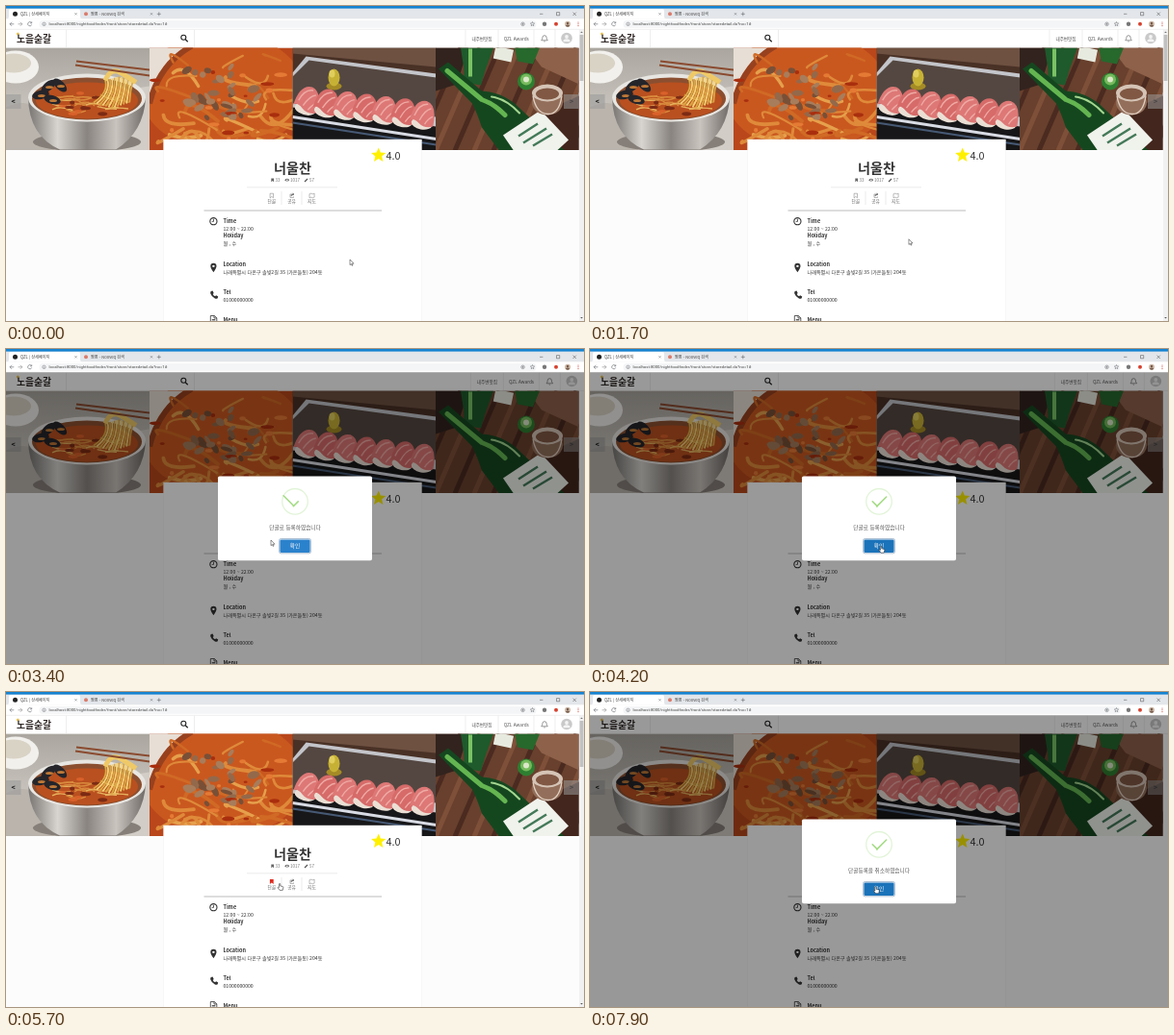
Animation, 600 px wide and 328 px high, one loop 8 s. Source, as an HTML page:

```html
<!DOCTYPE html>
<html lang="ko">
<head>
<meta charset="utf-8">
<title>상세페이지</title>
<style>
html, body { margin: 0; width: 100%; height: 100%; overflow: hidden; background: #fcfcfc; }
svg { display: block; width: 100vw; height: 100vh; }
text { font-family: "Noto Sans CJK KR", "Noto Sans CJK", "Noto Sans", sans-serif; white-space: pre; }
.url { font-family: Roboto, sans-serif; }
</style>
</head>
<body>
<svg id="stage" viewBox="0 0 600 328" preserveAspectRatio="none"></svg>
<script>
const LOOP = 8000;
let seed = 7;
const rnd = (a = 0, b = 1) => {
  seed = (seed * 16807) % 2147483647;
  return a + (b - a) * seed / 2147483647;
};
const times = (n, fn) => Array.from({ length: n }, (_, i) => fn(i)).join("");

// Markup helpers
const rect = (x, y, w, h, fill, more = "") =>
  `<rect x="${x}" y="${y}" width="${w}" height="${h}" fill="${fill}" ${more}/>`;
const oval = (x, y, rx, ry, fill, more = "") =>
  `<ellipse cx="${x}" cy="${y}" rx="${rx}" ry="${ry}" fill="${fill}" ${more}/>`;
const dot = (x, y, r, fill, more) => oval(x, y, r, r, fill, more);
const shape = (d, fill, more = "") => `<path d="${d}" fill="${fill}" ${more}/>`;
const line = (d, color, w = .6, more = "") =>
  `<path d="${d}" fill="none" stroke="${color}" stroke-width="${w}" ${more}/>`;
const text = (x, y, size, str, fill = "#444", more = "") =>
  `<text x="${x}" y="${y}" font-size="${size}" fill="${fill}" ${more}>${str}</text>`;
const mid = 'text-anchor="middle"';
const bold = 'font-weight="700"';
const round = 'stroke-linecap="round" stroke-linejoin="round"';
const at = (x, y, body) => `<g transform="translate(${x} ${y})">${body}</g>`;
const panel = (x, w, body) =>
  `<svg x="${x}" y="43.5" width="${w}" height="106.5" viewBox="0 0 ${w} 106.5">${body}</svg>`;

function browser() {
  const ink = "#5f6368";
  return rect(0, 0, 600, 13.5, "#e3e6ea") + rect(0, 0, 600, 2.6, "#1583d1") +
    shape("M1 13.5Q3 13 3 11V5Q3 3 5 3H75Q77 3 77 5V11Q77 13 79 13.5Z", "#fff") +
    dot(9.5, 8.3, 2.5, "#222") + text(15, 9.9, 4.15, "QZL | 상세페이지", "#333") +
    dot(83, 8.3, 2, "#d97b6c") + text(88, 9.9, 4.1, "짬뽕 - Nooveq 검색", "#444") +
    [72.5, 151].map(x => line(`M${x - 1.1} 7.2l2.2 2.2m0-2.2l-2.2 2.2`, ink, .5)).join("") +
    line("M156.8 8.3h4M158.8 6.3v4", ink) +
    line("M554 8.3h3.4M571.5 6.6h3.2v3.2h-3.2zM588.5 6.6l3.4 3.4m0-3.4l-3.4 3.4", "#444", .5) +
    rect(0, 13.5, 600, 10.8, "#fff") + rect(34.5, 15, 516, 7.8, "#f4f5f6", 'rx="3.9"') +
    line("M8.3 18.8H4m2-2l-2 2 2 2", ink) + line("M12.5 18.8h4.3m-2-2l2 2-2 2", "#888") +
    line("M26.4 17.4a2.1 2.1 0 1 0 .3 2M26.7 16.3v1.6h-1.6", ink) +
    dot(39.5, 18.8, 1.7, "none", `stroke="${ink}" stroke-width=".5"`) + line("M39.5 18.5v1.2", ink, .5) +
    text(44.5, 20.4, 4.25, "localhost:8000/nightfoodfinder/front/store/storedetail.do?no=1#", "#444", 'class="url"') +
    dot(536.5, 18.8, 1.8, "none", `stroke="${ink}" stroke-width=".5"`) + line("M535.4 18.8h2.2M536.5 17.7v2.2", ink, .5) +
    at(546.5, 18.8, star(2.3, "none", `stroke="${ink}" stroke-width=".5"`)) +
    dot(559, 18.8, 2.2, "#777") + dot(571, 18.8, 2, "#d5422f") +
    dot(583, 18.8, 3, "#cdb9a7") + dot(583, 18, 1.2, "#765a4b") + shape("M580.8 20.8q2.2-2.4 4.4 0q-2 1.8-4.4 0", "#765a4b") +
    [17, 18.8, 20.6].map(y => dot(594, y, .55, "#d04437")).join("") +
    line("M0 24.3H600", "#ddd", .5);
}

function star(r, fill, more) {
  const pts = Array.from({ length: 10 }, (_, i) => {
    const a = i * Math.PI / 5 - Math.PI / 2, k = i % 2 ? r * .45 : r;
    return `${(k * Math.cos(a)).toFixed(2)} ${(k * Math.sin(a)).toFixed(2)}`;
  });
  return shape(`M${pts.join("L")}Z`, fill, more);
}

function header() {
  return rect(0, 24.5, 600, 19, "#fff") + line("M0 43.3H600", "#ddd", .5) +
    dot(12.3, 29, 1.5, "#eac65b") + text(11, 38, 9.8, "노을숟갈", "#2c2523", bold) +
    line("M62.5 24.5V43M195.5 24.5V43", "#e3e3e3", .6) +
    dot(184.3, 32.8, 2.5, "none", 'stroke="#222" stroke-width="1.1"') + line("M186.2 34.7l2.5 2.5", "#222", 1.3) +
    `<g id="menu">` + line("M477 24.5V43M511 24.5V43M548 24.5V43M570 24.5V43", "#e3e3e3", .6) +
    text(494, 35.8, 4.6, "내주변맛집", "#555", mid) + text(529.7, 35.8, 4.7, "QZL Awards", "#555", mid) +
    line("M555.7 35.8q1.2-1 1.2-3a2.1 2.1 0 0 1 4.2 0q0 2 1.2 3zM558.3 36.8q.7.8 1.4 0", "#555", .6) +
    dot(582, 33.5, 5.8, "#c9c9c9") + dot(582, 32, 1.9, "#f4f4f4") + shape("M578.3 37.2q0-3 3.7-3t3.7 3z", "#f4f4f4") + `</g>`;
}

function noodleBowl() {
  return rect(0, 0, 149, 107, "url(#kitchen)") + shape("M0 62L149 40V107H0Z", "#d2cdc6") +
    oval(10, 20, 24, 17, "#f2f0ec") + oval(8, 16, 18, 10, "#d9d3c6") +
    shape("M0 62Q25 50 40 70L50 107H0Z", "#bab4ad") +
    oval(84, 98, 56, 10, "#867f79") +
    shape("M23 52Q24 92 56 106H114Q143 88 145 52Z", "url(#steel)") +
    oval(84, 52, 61, 25, "#e8e6e2") + oval(84, 53, 57, 22, "#8b4f30") + oval(84, 55, 53, 19, "#b9501f") +
    times(20, () => line(`M${rnd(48, 110)} ${rnd(46, 66)}q${rnd(6, 14)} ${rnd(-8, 8)} ${rnd(14, 24)} ${rnd(-3, 4)}`, rnd() < .5 ? "#e6b25e" : "#d98b3d", 1.4)) +
    times(11, () => oval(rnd(52, 108), rnd(43, 69), rnd(2, 5), rnd(1, 2.5), rnd() < .5 ? "#7c2b14" : "#d9612a")) +
    [[44, 40], [36, 49], [48, 54], [56, 39]].map(([x, y], i) =>
      oval(x, y, 9, 4.5, "#25252a", `transform="rotate(${-40 + i * 28} ${x} ${y})"`) + oval(x + 1, y + 1, 4, 1.6, "#bd7837")).join("") +
    times(13, i => line(`M${103 + i * 2.4} ${30 + Math.abs(i - 6) * .6}Q${107 + i * 1.8} 46 ${91 + i * 3.1} ${63 - Math.abs(i - 6)}`, i % 2 ? "#f4d277" : "#dba844", 1.8)) +
    line("M103 34Q109 20 119 26T135 36", "#efc967", 5) +
    line("M72 18L149 29M73 14L149 23", "#8a4b30", 1.8);
}

function stew() {
  return rect(0, 0, 149, 107, "#b9471b") + oval(76, 46, 85, 62, "#c9581f") +
    shape("M0 0H38Q8 20 0 52Z", "#e7ded5") + line("M44-2Q10 17 0 58", "#98411e", 6) +
    times(34, () => {
      const x = rnd(8, 130), y = rnd(8, 98);
      return line(`M${x} ${y}q${rnd(-15, 25)} ${rnd(-22, 22)} ${rnd(15, 40)} ${rnd(-14, 14)}`, ["#df8a3a", "#e6a04c", "#d06a25"][rnd(0, 3) | 0], rnd(2, 4), round);
    }) +
    times(34, () => {
      const x = 74 + rnd(-36, 38), y = 43 + rnd(-26, 30);
      return oval(x, y, rnd(3, 7), rnd(2, 4), ["#785037", "#93694b", "#a77d5c"][rnd(0, 3) | 0], `transform="rotate(${rnd(-70, 70)} ${x} ${y})"`);
    }) +
    times(18, () => oval(rnd(5, 145), rnd(5, 102), rnd(2, 7), rnd(1, 2.5), rnd() < .6 ? "#a92e0e" : "#e57a35"));
}

function sashimi() {
  return rect(0, 0, 149, 107, "#493126") + shape("M0 0H149V20L0 6Z", "#6e5141") +
    shape("M14 9L149 27V84L0 66V26Z", "#c3c5ca") + shape("M17 13L149 31V72L0 58V30Z", "#544741") +
    shape("M0 62L149 82V107H0Z", "#171719") + line("M0 72L149 95", "#d8dbe3", 3) + line("M0 78L149 101", "#465974", 2) +
    oval(43, 40, 8, 4, "#a58b25") + oval(43, 31, 6, 9, "#c7b135") + oval(41, 27, 3, 4, "#e0ce5d") +
    times(7, i => at(15 + i * 20, 53 + i * 2.5,
      `<g transform="rotate(${16 - i})">` + oval(1, 11, 11, 6, "#ebdfd4") +
      shape("M-12 10Q-11-13 2-13Q14-11 13 12Q5 16-2 11T-12 10Z", i % 2 ? "#d66b69" : "#dd7876") +
      line("M-8 4Q-5-9 4-10M-2 8Q2-4 8-6M4 11Q7 4 11 2", "#efaaa4", 1.4) + `</g>`));
}

function bottles() {
  return rect(0, 0, 149, 107, "#68402d") +
    times(9, i => line(`M${i * 20 - 20} 107L${i * 20 + 26} 0`, i % 2 ? "#7f5039" : "#4b2a20", 5)) +
    shape("M0 0H34L22 38 0 45Z", "#32231e") + shape("M95 0H149V38L110 20Z", "#8e614a") +
    shape("M70 85L149 50V107H92Z", "#43261d") +
    shape("M26 0H60L52 22 47 39 30 36 29 20Z", "#1e5a2b") + line("M36 1L36 30", "#7ac265", 4) +
    rect(61, 0, 19, 13, "#e7eadf", 'transform="rotate(12 70 6)"') + shape("M82 0H108L101 17 85 14Z", "#27682d") +
    dot(94, 35, 9, "#2e7e31") + dot(94, 33, 6, "#75b95c") + dot(94, 33, 3, "#dbe7c9") +
    shape("M3 22L13 15 48 45Q67 46 82 58L134 107H66L48 83Q43 68 38 58Z", "#15471f") +
    line("M12 24L48 54Q60 58 72 70", "#64b551", 5, round) + line("M58 51Q73 53 87 68", "#a4d690", 2, round) +
    shape("M70 91L109 65L138 96L126 107H81Z", "#f0f2ec") +
    line("M86 92l20-13M91 99l24-15M101 102l20-12", "#447a59", 2.5) +
    oval(116, 57, 16, 13, "#936f5b") + oval(116, 47, 16, 9, "#d5c4b6") + oval(116, 48, 12, 6, "#805844") +
    line("M101 50Q104 68 116 69T131 50", "#e1d0c2", 1.4);
}

function photos() {
  return panel(0, 149, noodleBowl()) + panel(149, 149, stew()) + panel(297.5, 149, sashimi()) + panel(446, 148.5, bottles()) +
    [0, 579].map(x => rect(x, 92, 15.5, 15, "#999", 'opacity=".55"')).join("") +
    text(7.5, 102, 7, "&lt;", "#111", mid + bold.padStart(20)) + text(587, 102, 7, "&gt;", "#444", mid + bold.padStart(20));
}

const bookmark = (x, y, s, fill, more) => at(x, y, shape(`M${-s} ${-s * 1.3}H${s}V${s * 1.4}L0 ${s * .6}L${-s} ${s * 1.4}Z`, fill, more));

function card() {
  const thin = 'stroke="#777" stroke-width=".5"', ink = "#333";
  const row = (y, label, value) => text(225.5, y, 5.5, label, ink, bold) + text(225.5, y + 7.8, 5.12, value, ink);
  return rect(163.5, 139, 268, 192, "#fff", 'stroke="#eee" stroke-width=".4"') +
    at(386.7, 155.5, star(8, "#fff000")) + text(394.5, 159.8, 10.8, "4.0", "#333") +
    text(297.5, 173.8, 14.1, "너울찬", "#333", mid + " " + bold) +
    bookmark(276.7, 181.2, 1.4, "#666") + text(279.5, 183, 4.5, "33", "#777") +
    oval(291.8, 181.2, 2.2, 1.4, "#777") + dot(291.8, 181.2, .7, "#fff") + text(295, 183, 4.5, "1017", "#777") +
    line("M310 183l3-3", "#555", 1.3) + text(315, 183, 4.5, "57", "#777") +
    line("M250 188.8H344", "#ddd", .6) + line("M286 193V207M307 193V207", "#ddd", .6) +
    `<g id="mark">${bookmark(275.8, 197.4, 1.7, "none", thin)}</g><g id="marked">${bookmark(275.8, 197.4, 1.9, "#e02b20")}</g>` +
    line("M297.5 196h-2.5v3.4h3.5v-1", "#666", .5) + line("M296 198q0-2 2.5-2m-1-1.2l1.2 1.2-1.2 1.2", "#333", .7) +
    line("M315 195.8l1.7-.7 1.7.7 1.7-.7v4l-1.7.7-1.7-.7-1.7.7z", "#777", .5) +
    ["단골", "공유", "지도"].map((s, i) => text(275.8 + i * 20.8, 205.3, 4.8, s, "#666", mid)).join("") +
    line("M205.5 213H390", "#bbb", 1.1) +
    dot(215.4, 224.2, 3.6, "none", `stroke="${ink}" stroke-width="1.1"`) + line("M215.5 221.8v2.6h-1.8", ink, .8) +
    row(225.8, "Time", "12:00 ~ 22:00") + row(241.2, "Holiday", "월 , 수") +
    shape("M215.4 277.2Q212.3 272.5 212.3 270.9A3.1 3.1 0 0 1 218.5 270.9Q218.5 272.5 215.4 277.2ZM215.4 269.7a1.2 1.2 0 1 0 .01 0Z", ink, 'fill-rule="evenodd"') +
    row(271.3, "Location", "나래특별시 다온구 솔빛2길 35 (가온들동) 204동") +
    shape("M212.8 297l1.7-.5 1.2 2.4-1 1q.8 1.6 2.4 2.4l1-1 2.1 1.2-.5 1.8q-1.3 1-3.2 0-3.2-1.7-4.2-4.7-.5-1.8.5-2.6z", ink) +
    row(299.7, "Tel", "01000000000") +
    line("M212.3 322.5h4l2.5 2.3v6h-6.5zM216 322.5v2.5h2.8M213.8 326.5h3.5M213.8 328h3.5", ink, .8) +
    text(225.5, 329, 5.5, "Menu", ink, bold);
}

const scrollbar = () => `<g id="scroll">` + rect(595, 24.5, 5, 304, "#f1f1f1") + rect(595.6, 30, 3.8, 48, "#c1c1c1") +
  shape("M596.2 28l1.3-1.6 1.3 1.6z", "#777") + shape("M596.2 324l1.3 1.6 1.3-1.6z", "#555") + `</g>`;

const modal = () => rect(0, 24.3, 600, 304, "#000", 'id="dim"') +
  `<g id="box">` + rect(220, 132.5, 160, 87.8, "#fff", 'rx="1.8"') +
  dot(300, 158.8, 13.3, "none", 'stroke="#a5dc86" stroke-opacity=".32" stroke-width="1.3"') +
  line("", "#a5dc86", 1.6, 'id="tip" stroke-linecap="round"') + line("", "#a5dc86", 1.6, 'id="long" stroke-linecap="round"') +
  text(300, 188.2, 5.65, "", "#545454", mid + ' id="msg"') +
  rect(283.6, 197.6, 32.8, 15.2, "none", 'rx="1.7" stroke="#9db4cb" stroke-width=".9"') +
  rect(284.4, 198.4, 31.2, 13.6, "#2b82cc", 'rx="1.3" id="ok"') +
  text(300, 207.3, 5.6, "확인", "#fff", mid) + `</g>`;

const cursor = () => `<g id="cursor"><g id="arrow">` +
  shape("M0 0V5.7L1.3 4.5 2.1 6.4 3 6 2.2 4.2H4Z", "#fff", 'stroke="#111" stroke-width=".45"') + `</g><g id="hand">` +
  shape("M-.6.6Q0-.2.7.6V2.8L3.3 3.4Q4 3.7 3.8 4.5L3.2 7.2H0L-2 4.5Q-1.8 3.5-.6 4.4Z", "#fff", 'stroke="#111" stroke-width=".5"') + `</g></g>`;

const gradient = (id, dir, ...colors) => `<linearGradient id="${id}" ${dir}>` +
  colors.map((c, i) => `<stop offset="${i / (colors.length - 1)}" stop-color="${c}"/>`).join("") + `</linearGradient>`;

const stage = document.getElementById("stage");
stage.innerHTML = `<defs>${gradient("kitchen", 'x2="0" y2="1"', "#aaa69f", "#ded9d2")}${gradient("steel", "", "#777471", "#d8d5d0", "#898480", "#c9c4be", "#6f6a66")}</defs>` +
  rect(0, 0, 600, 328, "#fcfcfc") + header() + photos() + card() + scrollbar() + browser() + modal() + cursor();
const el = id => document.getElementById(id);
const show = (id, on) => el(id).setAttribute("visibility", on ? "visible" : "hidden");

// cubic-bezier(.25, .1, .25, 1)
function ease(x) {
  let lo = 0, hi = 1;
  for (let i = 0; i < 18; i++) {
    const s = (lo + hi) / 2, r = 1 - s;
    if (.75 * r * s + s * s * s < x) lo = s; else hi = s;
  }
  const s = lo, r = 1 - s;
  return .3 * r * r * s + 3 * r * s * s + s * s * s;
}

// Keys are [time, value, value, ...]
function track(t, keys) {
  if (t <= keys[0][0]) return keys[0].slice(1);
  for (let i = 1; i < keys.length; i++) {
    const a = keys[i - 1], b = keys[i];
    if (t < b[0]) {
      const p = ease((t - a[0]) / (b[0] - a[0]));
      return a.slice(1).map((v, j) => v + (b[j + 1] - v) * p);
    }
  }
  return keys[keys.length - 1].slice(1);
}

const clamp = v => Math.max(0, Math.min(1, v));
const alerts = [
  { open: 2875, close: 4450, msg: "단골로 등록하였습니다" },
  { open: 6550, close: 9000, msg: "단골등록을 취소하였습니다" }
];
const path = [[1500, 357, 264], [2450, 276, 198], [2900, 276, 198], [3100, 275, 199], [3500, 275, 199],
  [4200, 302, 205], [4450, 302, 205], [4700, 304, 207], [5300, 304, 207], [6250, 276, 196], [6900, 276, 196], [7600, 296.5, 202.5]];
const grow = [[0, .7], [.45, 1.05], [.8, .95], [1, 1]];
// Stroke centre and length in em, relative to the ring
const tipKeys = [[.54, -2.375, -1.156, 0], [.7, -1.3125, -.156, 3.125], [.84, -.656, .656, 1.0625], [1, -.844, .469, 1.5625]];
const longKeys = [[.65, -.375, 1.03, 0], [.84, .78, -.156, 3.4375], [1, .53, .03, 2.9375]];

function stroke(id, [x, y, len], dir) {
  const em = 5.1, cx = 300 + x * em, cy = 158.8 + y * em, h = Math.max(0, len / 2 - .1) * em * Math.SQRT1_2;
  el(id).setAttribute("d", len > .2 ? `M${cx - h} ${cy - h * dir}L${cx + h} ${cy + h * dir}` : "");
}

function draw(t) {
  const a = alerts.find(a => t >= a.open && t < a.close + 250);
  const closing = a ? clamp((t - a.close) / 150) : 0;
  show("box", a && closing < 1);
  show("dim", a);
  if (a) {
    const age = t - a.open;
    const k = closing ? 1 - .5 * ease(closing) : track(age / 300, grow)[0];
    el("dim").setAttribute("opacity", .4 * clamp(age / 70) * (1 - clamp((t - a.close - 120) / 100)));
    el("box").setAttribute("transform", `translate(300 176.4) scale(${k}) translate(-300 -176.4)`);
    el("box").setAttribute("opacity", 1 - closing);
    if (el("msg").textContent !== a.msg) el("msg").textContent = a.msg;
    stroke("tip", track(age / 750, tipKeys), 1);
    stroke("long", track(age / 750, longKeys), -1);
  }
  const locked = t >= 2875 && t < 4800 || t >= 6550;
  show("scroll", !locked);
  el("menu").setAttribute("transform", `translate(${locked ? 5.3 : 0} 0)`);
  const on = t >= 2875 && t < 6550;
  show("mark", !on);
  show("marked", on);

  const [x, y] = track(t, path);
  const overOk = a && !closing && x > 284 && x < 316 && y > 198 && y < 212;
  const overMark = !a && x > 266 && x < 286 && y > 192 && y < 207;
  el("ok").setAttribute("fill", overOk ? "#1b73b9" : "#2b82cc");
  show("hand", overOk || overMark);
  show("arrow", !overOk && !overMark);
  el("cursor").setAttribute("transform", `translate(${x} ${y})`);
}

const start = performance.now();
function tick() {
  draw((performance.now() - start) % LOOP);
  requestAnimationFrame(tick);
}
draw(0);
requestAnimationFrame(tick);
</script>
</body>
</html>
```
